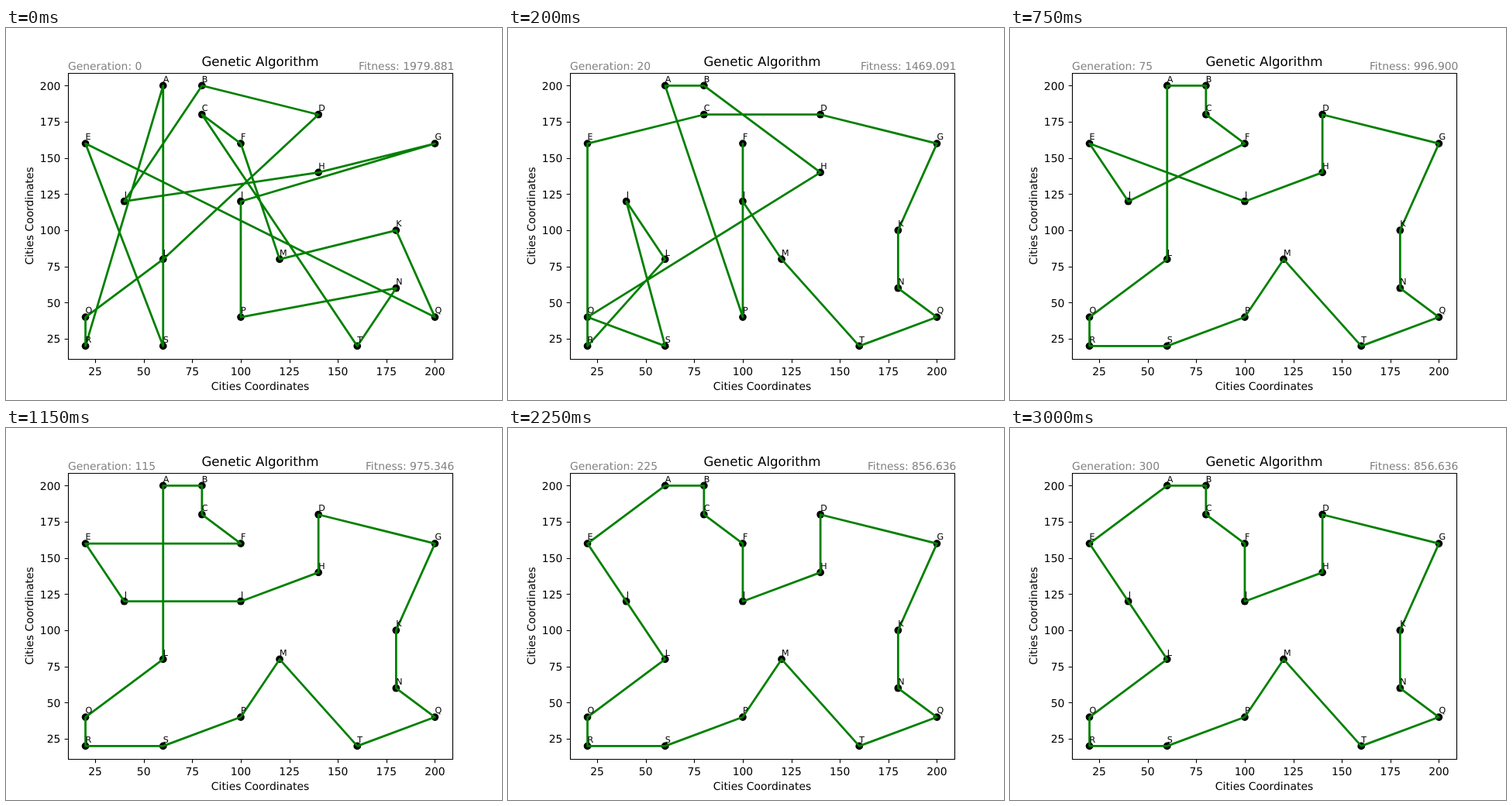
An HTML page that plays this animation: 640x480 px, repeating every 3050 ms.

```html
<!DOCTYPE html>
<html lang="en">
<head>
<meta charset="utf-8">
<title>Genetic Algorithm</title>
<style>
  html, body { margin: 0; width: 100%; height: 100%; overflow: hidden; background: #fff; }
  svg { display: block; width: 640px; height: 480px; }
  text { font: 13.89px "DejaVu Sans", sans-serif; text-rendering: geometricPrecision; }
  .title { font-size: 16.67px; }
  .city { font-size: 11.11px; }
  .note { fill: #808080; }
  .axis { fill: none; stroke: #000; stroke-width: 1.11; }
  .route { fill: none; stroke: #008000; stroke-width: 2.78; stroke-linejoin: round; }
</style>
</head>
<body>
<svg id="stage" viewBox="0 0 640 480"></svg>
<script>
const LOOP = 3050, STEP = 50;
const LEFT = 80, BOTTOM = 427.2;

const cities = {
  A: [60, 200], B: [80, 200], C: [80, 180], D: [140, 180], E: [20, 160],
  F: [100, 160], G: [200, 160], H: [140, 140], I: [40, 120], J: [100, 120],
  K: [180, 100], L: [60, 80], M: [120, 80], N: [180, 60], O: [20, 40],
  P: [100, 40], Q: [200, 40], R: [20, 20], S: [60, 20], T: [160, 20]
};

// Best route known from each time (ms) on
const routes = [
  [0, "ASEQKMFCTNPJGHIBDLOR"],
  [50, "ABDLORESIHGQKNTCMFJP"],
  [100, "ABHOSILRECDQNKGMTJFP"],
  [150, "ABHOSILRECDGKNQTMJFP"],
  [250, "ABHDGKNQTMLISOREJPFC"],
  [350, "ABROSLMPTQNKGDHJEIFC"],
  [450, "ABCFIEJHDGKNQTPMLSOR"],
  [700, "ABCFIEJHDGKNQTMPSROL"],
  [950, "ABCFEIJHDGKNQTMPSROL"],
  [1300, "ABCFJHDGKNQTMPSROLIE"]
];

const stage = document.getElementById("stage");
const px = x => LEFT + (x - 11) * 496 / 198;
const py = y => BOTTOM - (y - 11) * 369.6 / 198;
const snap = v => Math.floor(v + 0.5) + 0.5;

function add(tag, attrs) {
  const el = document.createElementNS("http://www.w3.org/2000/svg", tag);
  for (const key in attrs) el.setAttribute(key, attrs[key]);
  return stage.appendChild(el);
}

function label(str, x, y, anchor = "middle", cls = "") {
  const el = add("text", { x, y, "text-anchor": anchor, class: cls });
  el.textContent = str;
  return el;
}

function tourLength(route) {
  let sum = 0;
  for (let i = 0; i < route.length; i++) {
    const [x1, y1] = cities[route[i]];
    const [x2, y2] = cities[route[(i + 1) % route.length]];
    sum += Math.hypot(x2 - x1, y2 - y1);
  }
  return sum;
}

for (const [x, y] of Object.values(cities)) {
  add("circle", { cx: px(x), cy: py(y), r: 4.86 });
}

const path = add("polygon", { class: "route" });

for (let v = 25; v <= 200; v += 25) {
  const x = px(v), y = py(v);
  add("path", { class: "axis", d: `M${snap(x)} 427.5v4.86M80.5 ${snap(y)}h-4.86` });
  label(v, x, 448);
  label(v, 70.3, Math.round(y + 5.3), "end");
}
add("path", { class: "axis", d: "M80.5 58.5H576.5V427.5H80.5Z" });

for (const name in cities) {
  const [x, y] = cities[name];
  label(name, px(x), Math.round(py(y) - 4.6), "start", "city");
}

label("Genetic Algorithm", 328, 49, "middle", "title");
label("Cities Coordinates", 328, 467);
label("Cities Coordinates", 0, 0).setAttribute("transform", "translate(35 242.4) rotate(-90)");
const generation = label("", 80, 54, "start", "note");
const fitness = label("", 578.4, 54, "end", "note");

function draw(ms) {
  const t = Math.floor(ms % LOOP / STEP) * STEP;
  const route = routes.filter(r => r[0] <= t).pop()[1];
  path.setAttribute("points", [...route].map(c => px(cities[c][0]) + "," + py(cities[c][1])).join(" "));
  generation.textContent = "Generation: " + t / 10;
  fitness.textContent = "Fitness: " + tourLength(route).toFixed(3);
}

const start = performance.now();
function tick() {
  draw(performance.now() - start);
  requestAnimationFrame(tick);
}
tick();
</script>
</body>
</html>
```
